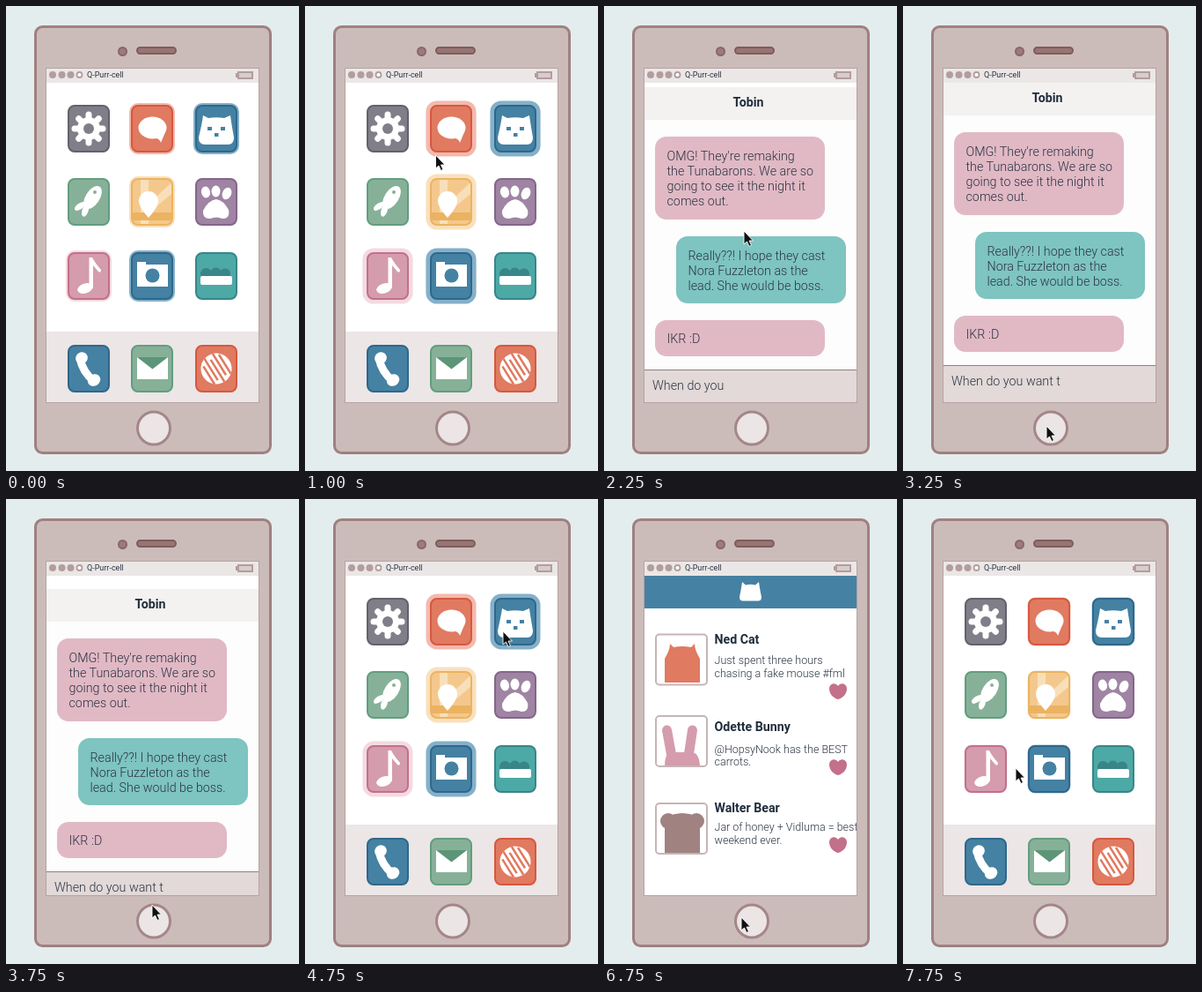
An HTML page for the animation above (8 s loop, 333 px wide and 527 px high).

```html
<!DOCTYPE html>
<html lang="en">
<head>
<meta charset="utf-8">
<title>Pocket phone</title>
<style>
html, body { margin: 0; width: 100%; height: 100%; overflow: hidden; background: #e4edee; }
svg { display: block; width: 100vw; height: 100vh; --g: 2; }
text { font-family: Roboto, "Open Sans", sans-serif; fill: #2b3442; white-space: pre; }
.chat { font-size: 14.3px; font-weight: 300; }
.post { font-size: 12.5px; font-weight: 300; }
.bold { font-size: 14.2px; font-weight: 700; fill: #1f2d3b; }
.grey { --f: #807f89; --s: #62616b; }
.red { --f: #e07a60; --s: #d6583f; --h: #f3b9ae; }
.blue { --f: #4581a2; --s: #2f678b; --h: #84b0c9; }
.green { --f: #86b198; --s: #629d7f; }
.amber { --f: #f4c88c; --s: #ebb361; --h: #f9e0bd; }
.plum { --f: #9f84a3; --s: #84668a; }
.pink { --f: #d49cad; --s: #c2708b; --h: #f3dae1; }
.teal { --f: #4da9a6; --s: #38858a; }
.tile { fill: var(--f); stroke: var(--s); stroke-width: 2; }
.halo { fill: none; stroke: var(--h); stroke-width: calc(var(--g) * 2px); }
.art { fill: #fff; }
.base { fill: var(--f); }
.dark { fill: var(--s); }
.avatar { fill: #fff; stroke: #c7b5b6; stroke-width: 2; }
</style>
</head>
<body>
<svg id="stage" viewBox="0 0 333 527">
  <defs>
    <rect id="tile" class="tile" x="1" y="1" width="46" height="52" rx="7"/>
    <rect id="halo" class="halo" width="48" height="54" rx="8"/>
    <path id="heart" fill="#c3708a" d="M0 9C-5 8-10 3-10-3C-10-9-3-11 0-6C3-11 10-9 10-3C10 3 5 8 0 9Z"/>
    <rect id="frame" class="avatar" x="59" width="58" height="57" rx="4"/>
    <clipPath id="screen"><rect x="46" y="87" width="241" height="362"/></clipPath>
    <clipPath id="inner"><rect x="2" y="2" width="44" height="50" rx="6"/></clipPath>
    <clipPath id="ball"><circle r="17.5"/></clipPath>
  </defs>

  <rect width="333" height="527" fill="#e4edee"/>
  <rect x="33.5" y="23.5" width="267" height="483" rx="8" fill="#cbbcba" stroke="#a08080" stroke-width="3"/>
  <circle cx="132.5" cy="51.5" r="4.5" fill="#9b7b7b" stroke="#8a6666" stroke-width="2"/>
  <rect x="149" y="47" width="44" height="7" rx="3.5" fill="#967573" stroke="#7f5c5c" stroke-width="2"/>
  <circle cx="168" cy="478.5" r="18.5" fill="#ebe5e5" stroke="#a58688" stroke-width="3"/>
  <rect x="45.5" y="70.5" width="242" height="379" fill="#fff" stroke="#b7a2a2"/>
  <rect x="46" y="71" width="241" height="16" fill="#ece7e7"/>
  <g fill="#b39d9d">
    <circle cx="53" cy="78" r="4"/><circle cx="63.5" cy="78" r="4"/><circle cx="73.5" cy="78" r="4"/>
    <circle cx="83.5" cy="78" r="3" fill="#fff" stroke="#b39d9d" stroke-width="1.8"/>
    <path d="M261 76h2v5h-2z"/>
    <rect x="264" y="75" width="16" height="7" fill="#d8cccc" stroke="#b39d9d" stroke-width="2"/>
  </g>
  <text x="92" y="81" font-size="9">Q-Purr-cell</text>

  <g clip-path="url(#screen)">
    <rect x="46" y="369" width="241" height="80" fill="#ece6e6"/>
    <g class="art">
      <g class="grey" transform="translate(70 112)">
        <use href="#tile"/>
        <path d="M24 11V43M8 27H40M12.7 15.7L35.3 38.3M12.7 38.3L35.3 15.7" stroke="#fff" stroke-width="7" stroke-linecap="round"/>
        <circle cx="24" cy="27" r="13"/><circle class="base" cx="24" cy="27" r="6"/>
      </g>
      <g class="red" transform="translate(142 112)">
        <use href="#halo"/><use href="#tile"/>
        <ellipse cx="24.5" cy="26" rx="16" ry="12.5"/><path d="M25 37Q33 38 34 43L39 31Z"/>
      </g>
      <g class="blue" transform="translate(215 112)">
        <use href="#halo"/><use href="#tile"/>
        <path d="M9 12L15 15Q24 13.5 33 15L40 12Q41 20 44 37Q44 45 37 45H11Q4 45 4 37Q8 20 9 12Z"/>
        <path class="base" d="M14 25h5v4h-5zM29 25h5v4h-5zM22 32h4.5v4h-4.5z"/>
      </g>
      <g class="green" transform="translate(70 195)">
        <use href="#tile"/>
        <ellipse cx="28.5" cy="22" rx="8" ry="14.5" transform="rotate(33 28.5 22)"/>
        <ellipse cx="14" cy="32" rx="3.5" ry="7" transform="rotate(55 14 32)"/>
        <ellipse cx="20" cy="37" rx="3.5" ry="7" transform="rotate(20 20 37)"/>
        <circle class="base" cx="31" cy="16" r="2"/>
      </g>
      <g class="amber" transform="translate(142 195)">
        <use href="#halo"/><use href="#tile"/>
        <g clip-path="url(#inner)">
          <path fill="#f8dfba" d="M11 0h9v54h-9zM28 22L46 5V18L28 33Z"/>
          <path class="dark" d="M0 39h48v9h-48z"/>
        </g>
        <path d="M20 45Q9 33 9 26A11 11 0 0 1 31 26Q31 33 20 45Z"/>
      </g>
      <g class="plum" transform="translate(215 195)">
        <use href="#tile"/>
        <ellipse cx="12" cy="16" rx="5" ry="6.5" transform="rotate(-12 12 16)"/>
        <ellipse cx="23.5" cy="15" rx="5" ry="6.5"/>
        <ellipse cx="36" cy="17.5" rx="5" ry="7" transform="rotate(24 36 17.5)"/>
        <path d="M24 24Q32 25 38 36Q40 46 31 46Q24 43 17 46Q8 46 9 37Q15 25 24 24Z"/>
      </g>
      <g class="pink" transform="translate(70 279)">
        <use href="#halo"/><use href="#tile"/>
        <ellipse cx="20" cy="41" rx="9" ry="5.5" transform="rotate(-18 20 41)"/>
        <path d="M24.5 6H28Q31 12 38 20Q38 24 35 22L29 15V41H24.5Z"/>
      </g>
      <g class="blue" transform="translate(142 279)">
        <use href="#halo"/><use href="#tile"/>
        <path d="M7 11h10v3h25v25h-35z"/><circle class="base" cx="24.5" cy="26.5" r="8"/>
      </g>
      <g class="teal" transform="translate(215 279)">
        <use href="#tile"/>
        <path class="dark" d="M7 28a6 6 0 0 1 11-7a6 6 0 0 1 11 0a6 6 0 0 1 10 7z"/>
        <rect x="6" y="27" width="36" height="10" rx="2"/>
      </g>
      <g class="blue" transform="translate(70 384)">
        <use href="#tile"/>
        <path d="M14 15Q17 31 30 41" fill="none" stroke="#fff" stroke-width="9"/>
        <ellipse cx="16" cy="15" rx="7" ry="6.5" transform="rotate(-30 16 15)"/>
        <ellipse cx="30" cy="40" rx="7.5" ry="6.5" transform="rotate(-30 30 40)"/>
      </g>
      <g class="green" transform="translate(142 384)">
        <use href="#tile"/>
        <path d="M7 14h35v25h-35z"/><path d="M7 14h35L24.5 27.5Z" fill="#5c9577"/>
      </g>
      <g class="red" transform="translate(215 384)">
        <use href="#tile"/>
        <g transform="translate(24 27) rotate(-32)">
          <circle r="17.5"/>
          <path clip-path="url(#ball)" d="M-11-10V18M-5.5-18V12M0-12V18M5.5-18V12M11-12V18" stroke="#e07a60" stroke-width="2.5"/>
        </g>
      </g>
    </g>

    <g id="chat">
      <rect x="46" y="87" width="241" height="362" fill="#fdfdfd"/>
      <rect x="46" y="87" width="241" height="37" fill="#f4f1f1"/>
      <text class="bold" x="164" y="109" text-anchor="middle">Tobin</text>
      <rect x="58" y="143" width="193" height="94" rx="13" fill="#e1b9c5"/>
      <rect x="82" y="256" width="193" height="76" rx="13" fill="#7ec4c0"/>
      <rect x="58" y="351" width="193" height="41" rx="13" fill="#e1b9c5"/>
      <g class="chat">
        <text x="71.5" y="170">OMG! They're remaking</text>
        <text x="71.5" y="187">the Tunabarons. We are so</text>
        <text x="71.5" y="204">going to see it the night it</text>
        <text x="71.5" y="221">comes out.</text>
        <text x="95.5" y="283">Really??! I hope they cast</text>
        <text x="95.5" y="300">Nora Fuzzleton as the</text>
        <text x="95.5" y="317">lead. She would be boss.</text>
        <text x="71.5" y="377">IKR :D</text>
        <path d="M46 407h241v42h-241z" fill="#e2d9d8"/>
        <path d="M46 407.5h241" stroke="#8d8080"/>
        <text id="typed" x="55" y="430"></text>
      </g>
    </g>

    <g id="feed">
      <rect x="46" y="87" width="241" height="362" fill="#fff"/>
      <rect x="46" y="87" width="241" height="37" fill="#4581a2"/>
      <path fill="#fff" d="M157 94L161 97.5Q166.500 96 172 97.500L176 94Q176.500 99 179 111Q179 115.500 175 115.500H158Q154 115.500 154 111Q156.500 99 157 94Z"/>
      <use href="#frame" y="153.500"/><use href="#frame" y="246"/><use href="#frame" y="345"/>
      <path fill="#e07a60" d="M75 164L79 168Q89 166 99 168L103 164Q103 171 109 181V208H69V181Q75 171 75 164Z"/>
      <g fill="#d49cad">
        <path d="M71.500 262L77 292M100.500 262L96 292" stroke="#d49cad" stroke-width="11" stroke-linecap="round"/>
        <path d="M69 302Q69 287 78 287H99Q108 287 109 302Z"/>
      </g>
      <g fill="#a08281">
        <circle cx="73" cy="365" r="9"/><circle cx="105" cy="365" r="9"/>
        <path d="M69 401V366Q70 357 89 356Q108 357 109 366V401Z"/>
      </g>
      <g class="bold">
        <text class="bold" x="125.500" y="164">Ned Cat</text>
        <text class="bold" x="125.500" y="263">Odette Bunny</text>
        <text class="bold" x="125.500" y="355">Walter Bear</text>
      </g>
      <g class="post">
        <text x="125.500" y="187">Just spent three hours</text>
        <text x="125.500" y="202">chasing a fake mouse #fml</text>
        <text x="125.500" y="287.500">@HopsyNook has the BEST</text>
        <text x="125.500" y="302">carrots.</text>
        <text x="125.500" y="376">Jar of honey + Vidluma = best</text>
        <text x="125.500" y="391">weekend ever.</text>
      </g>
      <use href="#heart" x="266" y="218"/><use href="#heart" x="266" y="304"/><use href="#heart" x="266" y="392"/>
    </g>
  </g>

  <path id="cursor" d="M0 0V15L3.500 12L6 17.500L8.500 16.300L6 11H10.500Z" fill="#111" stroke="#fff" stroke-width=".9"/>
</svg>
<script>
const LOOP = 8000, STEP = 250;
const message = "When do you want t";
const $ = id => document.getElementById(id);

// Each track holds [seconds, ...values], joined by straight lines.
const pointer = [
  [0.25, 128, 280], [0.75, 141, 195], [1.25, 156, 143], [1.75, 156, 143], [2, 157, 165],
  [2.25, 159, 255], [2.5, 162, 357], [2.75, 164, 430], [3, 163, 470], [3.25, 163, 476],
  [3.5, 163, 476], [3.75, 166, 460], [4, 184, 370], [4.25, 207, 250], [4.5, 222, 168],
  [4.75, 225, 150], [5.5, 225, 150], [5.75, 200, 205], [6, 172, 292], [6.25, 153, 390],
  [6.5, 153, 455], [6.75, 156, 474], [7.25, 156, 474], [7.5, 143, 405], [7.75, 128, 305]
];
const glow = [
  [0, 2], [0.5, 3.5], [1, 4.6], [1.5, 5], [1.75, 4.6], [2.5, 3], [3.5, 0.5],
  [4.25, 3.2], [4.75, 4.5], [5.5, 5], [6.5, 2.5], [7.25, 0.6], [7.75, 0.4]
];
const slide = start => [
  [start - 0.25, 362], [start, 345], [start + 0.25, 251], [start + 0.5, 43],
  [start + 0.75, 5], [start + 1, 0], [start + 2, 0],
  [start + 2.25, 15], [start + 2.5, 200], [start + 2.75, 362]
];
const panels = { chat: slide(1.5), feed: slide(5) };

function sample(track, t) {
  const next = track.findIndex(key => key[0] > t);
  if (next < 0) return track[track.length - 1].slice(1);
  if (next === 0) return track[0].slice(1);
  const a = track[next - 1], b = track[next];
  const k = (t - a[0]) / (b[0] - a[0]);
  return a.slice(1).map((v, i) => v + (b[i + 1] - v) * k);
}

function draw(t) {
  for (const id in panels) {
    const [y] = sample(panels[id], t);
    $(id).setAttribute("transform", `translate(0 ${y})`);
    $(id).style.display = y < 362 ? "" : "none";
  }
  const [x, y] = sample(pointer, t);
  $("cursor").setAttribute("transform", `translate(${x} ${y})`);
  $("cursor").style.display = t < 0.25 ? "none" : "";
  $("stage").style.setProperty("--g", sample(glow, t)[0]);
  const count = Math.floor(18.2 - (3.25 - t) * 5.4);
  $("typed").textContent = message.slice(0, Math.max(0, count));
}

const start = performance.now();
function tick() {
  const ms = (performance.now() - start) % LOOP;
  draw(Math.floor(ms / STEP) * STEP / 1000);
  requestAnimationFrame(tick);
}
tick();
</script>
</body>
</html>
```
